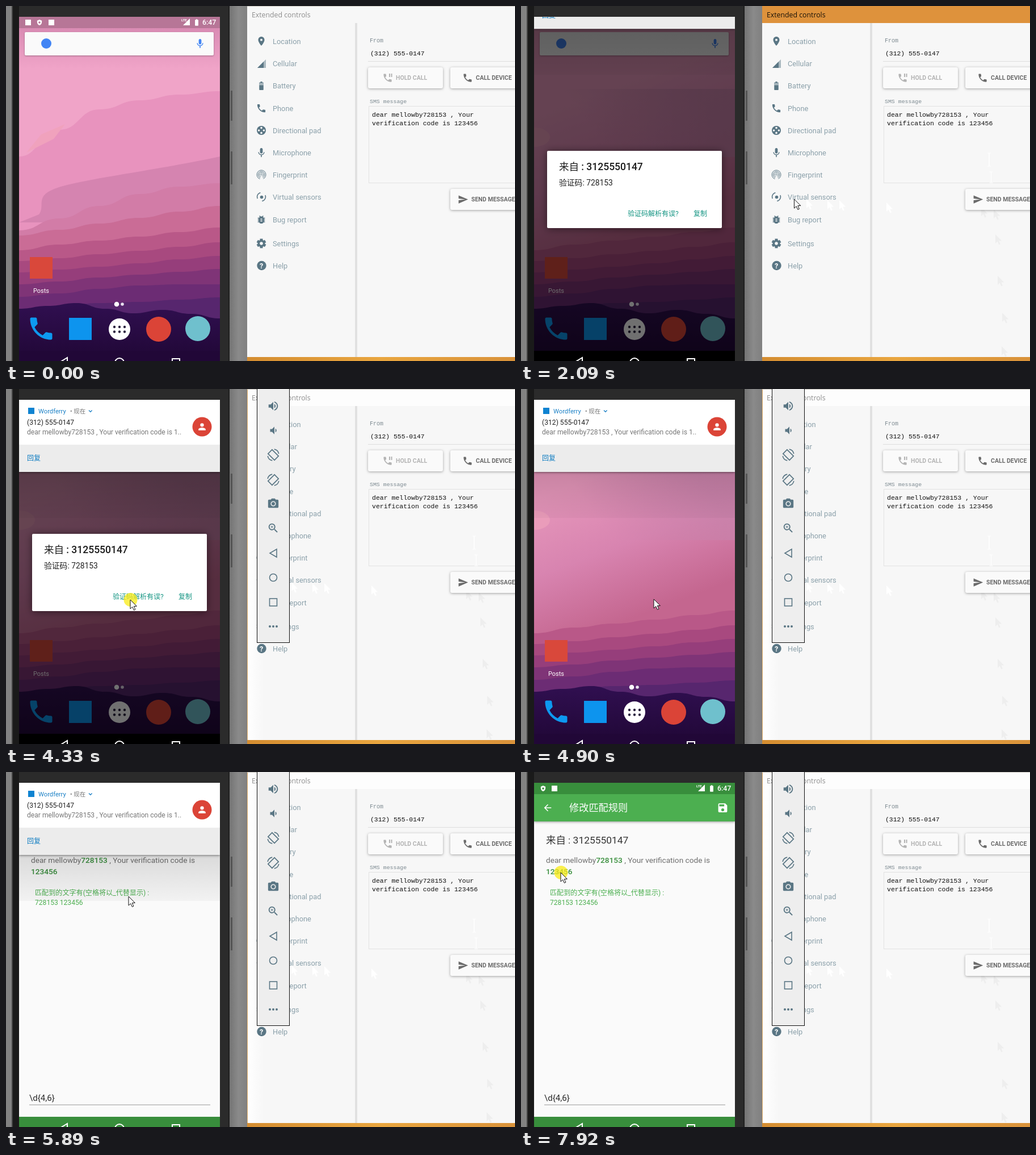
An HTML page with a canvas for the animation above (8 s loop, 897 by 625 pixels).

```html
<!DOCTYPE html>
<html lang="en">
<head>
<meta charset="utf-8">
<title>Message code demo</title>
<style>
html, body { margin: 0; width: 100%; height: 100%; overflow: hidden; }
canvas { display: block; width: 100vw; height: 100vh; }
</style>
</head>
<body>
<canvas id="stage" width="897" height="625"></canvas>
<script>
const ctx = document.getElementById('stage').getContext('2d');
const LOOP = 8000;
const SANS = 'Roboto, "Noto Sans CJK SC", "Noto Sans CJK", sans-serif';
const MONO = '"Liberation Mono", monospace';
const UI = '"Open Sans", sans-serif';
const SLATE = '#5a7684';

const USER = 'mellowby', CODE = '728153', CODE2 = '123456';
const PHONE = '(312) 555-0147', DIGITS = '3125550147';

const ICONS = {
  place: 'M12 2C8.13 2 5 5.13 5 9c0 5.25 7 13 7 13s7-7.75 7-13c0-3.87-3.13-7-7-7zm0 9.5c-1.38 0-2.5-1.12-2.5-2.5s1.12-2.5 2.5-2.5 2.5 1.12 2.5 2.5-1.12 2.5-2.5 2.5z',
  battery: 'M15.67 4H14V2h-4v2H8.33C7.6 4 7 4.6 7 5.33v15.33C7 21.4 7.6 22 8.33 22h7.33c.74 0 1.34-.6 1.34-1.33V5.33C17 4.6 16.4 4 15.67 4z',
  phone: 'M6.62 10.79c1.44 2.83 3.76 5.14 6.59 6.59l2.2-2.2c.27-.27.67-.36 1.02-.24 1.12.37 2.33.57 3.57.57.55 0 1 .45 1 1V20c0 .55-.45 1-1 1-9.39 0-17-7.61-17-17 0-.55.45-1 1-1h3.5c.55 0 1 .45 1 1 0 1.25.2 2.45.57 3.57.11.35.03.74-.25 1.02l-2.2 2.2z',
  mic: 'M12 14c1.66 0 3-1.34 3-3V5c0-1.66-1.34-3-3-3S9 3.34 9 5v6c0 1.66 1.34 3 3 3zm5.3-3c0 3-2.54 5.1-5.3 5.1S6.7 14 6.7 11H5c0 3.41 2.72 6.23 6 6.72V22h2v-4.28c3.28-.48 6-3.3 6-6.72h-1.7z',
  send: 'M2 21L23 12 2 3v7l15 2-15 2z',
  bug: 'M20 8h-2.81c-.45-.78-1.07-1.45-1.82-1.96L17 4.41 15.59 3l-2.17 2.17a6 6 0 0 0-2.83 0L8.41 3 7 4.41l1.62 1.63C7.88 6.55 7.26 7.22 6.81 8H4v2h2.09L6 11v1H4v2h2v1l.09 1H4v2h2.81a6 6 0 0 0 10.38 0H20v-2h-2.09l.09-1v-1h2v-2h-2v-1l-.09-1H20zm-6 8h-4v-2h4zm0-4h-4v-2h4z',
  speaker: 'M3 9v6h4l5 5V4L7 9z',
  wave: 'M16.5 12c0-1.77-1.02-3.29-2.5-4.03v8.05c1.48-.73 2.5-2.25 2.5-4.02z',
  loud: 'M14 3.23v2.06c2.89.86 5 3.54 5 6.71s-2.11 5.85-5 6.71v2.06c4.01-.91 7-4.49 7-8.77s-2.99-7.86-7-8.77z',
  camera: 'M9 2L7.17 4H4c-1.1 0-2 .9-2 2v12c0 1.1.9 2 2 2h16c1.1 0 2-.9 2-2V6c0-1.1-.9-2-2-2h-3.17L15 2zm3 15a5 5 0 1 1 0-10 5 5 0 0 1 0 10z',
  zoom: 'M15.5 14h-.79l-.28-.27A6.5 6.5 0 1 0 13.73 14.43l.27.28v.79l5 4.99L20.49 19zm-6 0a4.5 4.5 0 1 1 0-9 4.5 4.5 0 0 1 0 9zM12 10h-2v2H9v-2H7V9h2V7h1v2h2z',
  save: 'M17 3H5a2 2 0 0 0-2 2v14a2 2 0 0 0 2 2h14a2 2 0 0 0 2-2V7zm-5 16a3 3 0 1 1 0-6 3 3 0 0 1 0 6zm3-10H5V5h10z',
  back: 'M20 11H7.83l5.59-5.59L12 4l-8 8 8 8 1.41-1.41L7.83 13H20z',
  person: 'M12 12a4 4 0 1 0 0-8 4 4 0 0 0 0 8zm0 2c-2.67 0-8 1.34-8 4v2h16v-2c0-2.66-5.33-4-8-4z',
  shield: 'M12 1L3 5v6c0 5.5 3.8 10.7 9 12 5.2-1.3 9-6.5 9-12V5zm0 7a4 4 0 1 1 0 8 4 4 0 0 1 0-8z'
};
for (const k in ICONS) ICONS[k] = new Path2D(ICONS[k]);

// ---- drawing helpers ----
function rect(x, y, w, h, fill) { ctx.fillStyle = fill; ctx.fillRect(x, y, w, h); }
function disc(x, y, r, fill) {
  ctx.fillStyle = fill; ctx.beginPath(); ctx.arc(x, y, r, 0, 7); ctx.fill();
}
function ring(x, y, r, color, w = 1.5, a = 0, b = Math.PI * 2) {
  ctx.strokeStyle = color; ctx.lineWidth = w;
  ctx.beginPath(); ctx.arc(x, y, r, a, b); ctx.stroke();
}
function path(pts) {
  ctx.beginPath();
  pts.forEach(([x, y], i) => i ? ctx.lineTo(x, y) : ctx.moveTo(x, y));
}
function line(pts, color, w = 1.5) {
  ctx.strokeStyle = color; ctx.lineWidth = w; path(pts); ctx.stroke();
}
function text(s, x, y, size, color, weight = 400, family = SANS) {
  ctx.font = `${weight} ${size}px ${family}`;
  ctx.fillStyle = color;
  ctx.fillText(s, x, y + size * 0.36);
  return x + ctx.measureText(s).width;
}
function icon(name, cx, cy, size, color) {
  ctx.save();
  ctx.translate(cx - size / 2, cy - size / 2);
  ctx.scale(size / 24, size / 24);
  ctx.fillStyle = color;
  ctx.fill(ICONS[name], 'evenodd');
  ctx.restore();
}
function card(x, y, w, h, fill, blur, alpha, r = 2) {
  ctx.save();
  ctx.shadowColor = `rgba(0,0,0,${alpha})`;
  ctx.shadowBlur = blur; ctx.shadowOffsetY = 1;
  ctx.fillStyle = fill;
  ctx.beginPath(); ctx.roundRect(x, y, w, h, r); ctx.fill();
  ctx.restore();
}
function fade(x0, y0, x1, y1, ...stops) {
  const g = ctx.createLinearGradient(x0, y0, x1, y1);
  stops.forEach((c, i) => g.addColorStop(i / (stops.length - 1), c));
  return g;
}
const span = (t, a, b) => Math.min(1, Math.max(0, (t - a) / (b - a)));

// ---- pointer ----
const ROUTE = [
  [50, 847, 599], [150, 848, 540], [270, 840, 475], [390, 836, 402], [480, 833, 358],
  [560, 828, 303], [620, 825, 270], [800, 825, 270], [1030, 831, 342], [1400, 831, 342],
  [1500, 811, 354], [1740, 746, 352], [1850, 644, 346], [1930, 561, 342], [1970, 540, 342],
  [2030, 503, 340], [2090, 482, 340], [2200, 422, 346], [2500, 270, 350], [2660, 258, 348],
  [2830, 232, 325], [2890, 229, 300], [3200, 160, 94], [3350, 126, 92], [3640, 126, 316],
  [3720, 130, 320], [4200, 219, 371], [4600, 219, 371], [4900, 234, 370], [5200, 234, 370],
  [5850, 216, 219], [5950, 216, 219], [6280, 125, 75], [6380, 125, 75], [6770, 465, 78],
  [6900, 440, 110], [7200, 228, 240], [7330, 200, 243], [7600, 113, 176], [7860, 70, 177], [LOOP, 70, 177]
];
const CLICKS = [[1220, 1340], [4260, 4570], [6330, 6760], [7850, LOOP]];
const GHOSTS = [0, 1, 2, 3, 4, 10, 12, 13, 14, 15, 16];

function pointer(t) {
  const i = ROUTE.findIndex(p => p[0] >= t);
  if (i <= 0) return [ROUTE[0][1], ROUTE[0][2]];
  const [a, ax, ay] = ROUTE[i - 1], [b, bx, by] = ROUTE[i];
  const u = span(t, a, b);
  return [ax + (bx - ax) * u, ay + (by - ay) * u];
}
function arrow(x, y, fill, edge) {
  ctx.save(); ctx.translate(x, y);
  path([[0, 0], [0, 16], [3.7, 12.6], [6.4, 18.4], [8.9, 17.2], [6.3, 11.6], [11.3, 11.4]]);
  ctx.closePath();
  ctx.fillStyle = fill; ctx.fill();
  if (edge) { ctx.strokeStyle = edge; ctx.lineWidth = 1; ctx.stroke(); }
  ctx.restore();
}
function beam(x, y, h, color) {
  line([[x - 3, y], [x + 3, y]], color, 1);
  line([[x, y], [x, y + h]], color, 1.4);
  line([[x - 3, y + h], [x + 3, y + h]], color, 1);
}

// ---- phone ----
// colour, then edge heights from the left side to the right side
const BANDS = [
  ['#e893be', 265, 218, 182, 166, 156, 150],
  ['#d584b0', 381, 352, 308, 297, 279, 265],
  ['#d27ca7', 395, 374, 352, 331, 318, 312],
  ['#ca6c96', 404, 394, 383, 373, 362, 352],
  ['#b95888', 430, 420, 413, 406, 398, 390],
  ['#a8497f', 449, 444, 437, 431, 424, 416],
  ['#963e7b', 469, 464, 459, 453, 446, 440],
  ['#7f3477', 490, 485, 478, 473, 468, 463],
  ['#6c2c74', 512, 506, 498, 492, 490, 490],
  ['#57266e', 533, 529, 523, 521, 517, 513]
];
function wave(ys) {
  const step = 354 / (ys.length - 1);
  ctx.beginPath(); ctx.moveTo(23, ys[0]);
  for (let i = 1; i < ys.length; i++) {
    const x = 23 + step * i, m = x - step / 2;
    ctx.bezierCurveTo(m, ys[i - 1], m, ys[i], x, ys[i]);
  }
  ctx.lineTo(377, 625); ctx.lineTo(23, 625); ctx.closePath();
}
// under the dialog the upper bands melt into one slanted gradient
function wallpaper(soft) {
  rect(23, 19, 354, 606, soft
    ? fade(90, 170, 180, 410, '#e697bb', '#d884b0', '#c4668f')
    : fade(0, 40, 0, 110, '#da8cb4', '#f0a4c8'));
  if (soft) {
    rect(23, 146, 354, 120, fade(150, 250, 300, 140, 'rgba(200,130,170,0)', 'rgba(200,130,170,.8)'));
    ctx.fillStyle = '#ea9cba';
    ctx.beginPath(); ctx.ellipse(23, 231, 28, 17, 0, 0, 7); ctx.fill();
  }
  BANDS.forEach(([color, ...ys], i) => {
    if (soft && i < 4) return;
    if (i === 1) {
      ctx.beginPath(); ctx.moveTo(377, 265);
      ctx.bezierCurveTo(250, 292, 130, 305, 85, 322);
      ctx.bezierCurveTo(50, 336, 70, 352, 58, 367);
      ctx.lineTo(23, 381); ctx.lineTo(377, 381); ctx.closePath();
    } else wave(ys);
    ctx.fillStyle = color; ctx.fill();
    if (!i) {
      path([[36, 258], [62, 226], [104, 208], [84, 234]]);
      ctx.fillStyle = '#f0a2bd'; ctx.fill();
    }
  });
  wave([533, 528, 523, 533, 541, 535, 542, 550]);
  ctx.fillStyle = fade(0, 525, 0, 612, '#300f50', '#220839'); ctx.fill();
}
function status(bg, full) {
  rect(23, 19, 354, 20, bg);
  if (full) rect(34, 24, 10, 10, '#fff');
  icon('shield', full ? 59 : 39, 29, 11, '#fff');
  rect(full ? 75 : 54, 24, 10, 10, '#fff');
  text('LTE', 309, 25, 6, '#fff', 700);
  path([[312, 34], [324, 34], [324, 22]]); ctx.fillStyle = '#fff'; ctx.fill();
  icon('battery', 336, 29, 14, '#fff');
  text('6:47', 346, 29, 12.4, '#fff', 500);
}
function home(t) {
  wallpaper(t > 1860);
  card(33, 46, 333, 41, '#fafafa', 3, 0.3);
  disc(71, 66, 9, '#4285f4');
  icon('mic', 342, 66, 19, '#4285f4');
  rect(42, 442, 40, 38, '#d9483b');
  text('Posts', 48, 501, 10.9, '#fff');
  disc(195, 525, 4.3, '#fff');
  disc(205, 525, 2.8, '#e8e0ee');
  icon('phone', 62, 568, 52, '#0d99f0');
  rect(111, 549, 40, 39, '#0d94ee');
  disc(200, 569, 19, '#fff');
  for (let i = 0; i < 6; i++) disc(191 + i % 3 * 9, 565 + (i > 2) * 8.5, 2.2, '#2c2240');
  disc(269, 569, 22, '#db4437');
  disc(338, 568, 22, '#6fc0cd');
  status(t > 1650 && t < 4570 ? '#000' : 'rgba(0,0,0,.16)', true);
}
function dialog(alpha) {
  ctx.globalAlpha = alpha;
  card(46, 255, 308, 136, '#fff', 14, 0.5);
  text('来自 : ' + DIGITS, 67, 283, 17.5, '#1c1c1c', 500);
  text('验证码: ' + CODE, 67, 311, 13.8, '#222');
  text('验证码解析有误?', 188, 366, 12, '#159583');
  text('复制', 304, 366, 12, '#159583');
  ctx.globalAlpha = 1;
}
function editor() {
  rect(23, 19, 354, 606, '#fafafa');
  card(23, 39, 354, 48, '#4caf50', 4, 0.4, 0);
  status('#388e3c', false);
  icon('back', 47, 63, 19, '#fff');
  text('修改匹配规则', 85, 63, 17.2, '#fff');
  icon('save', 355.5, 63, 21, '#fff');
  text('来自 : ' + DIGITS, 44, 120, 17.4, '#333');
  let x = text('dear ' + USER, 44, 155, 13.65, '#6f6f6f');
  x = text(CODE, x, 155, 13.65, '#388e3c', 500);
  text(' , Your verification code is', x, 155, 13.65, '#6f6f6f');
  text(CODE2, 44, 175, 13.65, '#388e3c', 500);
  text('匹配到的文字有(空格将以_代替显示) :', 51, 213, 12.1, '#4caf50');
  text(CODE + ' ' + CODE2, 51, 230, 12.1, '#4caf50');
  text('\\d{4,6}', 41, 574, 15.1, '#2b2b2b');
  rect(41, 585.5, 319, 1, '#9a9a9a');
}
function notice(dx, dy) {
  ctx.save();
  ctx.translate(dx, dy);
  ctx.globalAlpha = 1 - span(dx, 120, 350);
  rect(23, 146, 354, 81, fade(0, 146, 0, 227, 'rgba(0,0,0,.13)', 'rgba(0,0,0,.03)'));
  card(23, 19, 354, 127, '#ececec', 4, 0.5, 0);
  rect(23, 19, 354, 79, '#fff');
  rect(39, 33, 11, 11, '#0f83d1');
  text('Wordferry', 57, 39, 11.2, '#1b80c6');
  text('• 现在', 113, 39, 10.5, '#777');
  line([[146, 37.5], [148.8, 40.3], [151.6, 37.5]], '#1b80c6', 1.3);
  text(PHONE, 37, 59, 12.15, '#222');
  text(`dear ${USER}${CODE} , Your verification code is 1..`, 37, 76, 12.1, '#777');
  disc(345.5, 66.5, 17, '#db4437');
  icon('person', 345.5, 66.5, 19, '#fff');
  text('回复', 37, 122, 12, '#0f7dc2');
  ctx.restore();
}
function navbar(bg) {
  rect(23, 607, 354, 18, bg);
  path([[108, 619], [95, 627], [108, 635]]); ctx.closePath();
  ctx.strokeStyle = '#fff'; ctx.lineWidth = 2; ctx.stroke();
  ring(200, 628, 8, '#fff', 2);
  ctx.strokeRect(293, 621, 13, 13);
}
function phone(t, px) {
  rect(0, 0, 425, 625, '#828282');
  rect(394, 0, 31, 625, fade(394, 0, 425, 0, '#747474', '#8a8a8a', '#808080'));
  rect(10, 0, 384, 625, '#2b2b2b');
  rect(10, 0, 2, 625, '#444');
  rect(12, 0, 11, 625, '#1a1a1a');
  rect(392, 0, 2, 625, '#202020');
  rect(396, 149, 3, 53, '#555');
  rect(396, 256, 3, 58, '#555');

  ctx.save();
  ctx.beginPath(); ctx.rect(23, 19, 354, 606); ctx.clip();
  const dim = t < 4570 ? span(t, 1780, 1960) : 1 - span(t, 4570, 4900);
  const open = 1 - Math.pow(1 - span(t, 5140, 5480), 2);
  if (open < 1) {
    home(t);
    if (dim) rect(23, 39, 354, 586, `rgba(0,0,0,${0.56 * dim})`);
    const shown = t < 4570 ? span(t, 1800, 1960) : 1 - span(t, 4570, 4720);
    if (shown) dialog(shown);
  }
  if (open) {
    ctx.save();
    ctx.globalAlpha = open;
    ctx.translate(0, 48 * (1 - open));
    editor();
    ctx.restore();
  }
  navbar(open ? '#388e3c' : dim > 0.5 ? '#000' : 'rgba(32,8,54,.6)');
  if (t > 2030 && t < 6800) {
    const drag = t > 6380 ? Math.max(0, px - 125) * 1.05 : 0;
    notice(drag, -128 * Math.pow(1 - span(t, 2030, 2830), 2.4));
  }
  ctx.restore();
}

// ---- extended controls window ----
const MENU = [
  ['Location', 62, y => icon('place', 450, y, 19, SLATE)],
  ['Cellular', 101, y => {
    path([[443, y + 8], [458, y + 8], [458, y - 7]]); ctx.fillStyle = '#a9b8bf'; ctx.fill();
    path([[443, y + 8], [454, y + 8], [454, y - 3]]); ctx.fillStyle = SLATE; ctx.fill();
  }],
  ['Battery', 140.5, y => { icon('battery', 450, y, 18, SLATE); rect(446, y - 5, 8, 4, '#a9b8bf'); }],
  ['Phone', 180, y => icon('phone', 450, y, 19, SLATE)],
  ['Directional pad', 219, y => {
    disc(450, y, 8, SLATE);
    for (let i = 0; i < 4; i++) disc(450 + 4.4 * Math.cos(i * Math.PI / 2), y + 4.4 * Math.sin(i * Math.PI / 2), 1.8, '#f7f7f7');
  }],
  ['Microphone', 258, y => icon('mic', 450, y, 19, SLATE)],
  ['Fingerprint', 297, y => {
    for (let r = 1.4; r < 9; r += 2.2) ring(450, y, r, SLATE, 1, 1.9, 7.4);
  }],
  ['Virtual sensors', 336, y => {
    disc(450.5, y + 0.5, 2.8, SLATE);
    ring(450, y, 7.5, SLATE, 1.6, 2.7, 4.5);
    ring(450, y, 7.5, SLATE, 1.6, -0.4, 1.4);
  }],
  ['Bug report', 376, y => icon('bug', 450, y, 19, SLATE)],
  ['Settings', 418, y => {
    for (let i = 0; i < 6; i++) {
      ctx.save(); ctx.translate(450, y); ctx.rotate(i * Math.PI / 3);
      rect(-2.5, -8.3, 5, 5, SLATE); ctx.restore();
    }
    ring(450, y, 4.6, SLATE, 3.6);
  }],
  ['Help', 457, y => { disc(450.5, y, 8.2, SLATE); text('?', 447, y, 12.5, '#fff', 700); }]
];
function button(x, y, label, name, tx, color) {
  card(x, y, x < 700 ? 132 : 130, 37, '#fafafa', 4, 0.35, 3);
  icon(name, tx - 14.5, y + 18.5, 19, color);
  text(label, tx, y + 18.5, 10.5, color, 700);
}
function controls(t, active, docked) {
  rect(425, 0, 472, 625, '#f7f7f7');
  if (docked) {
    rect(425, 0, 472, 30, '#fdfdfd');
    rect(425, 30, 30, 588, fade(425, 0, 455, 0, '#fff', '#f7f7f7'));
    rect(425, 0, 1, 618, '#e3b06a');
  }
  rect(425, 0, 472, 1, active ? '#d08430' : '#c9c5bd');
  if (active) rect(425, 0, 472, 30, '#de923c');
  text('Extended controls', 433, 15.5, 12.3, active ? '#1a1208' : '#8d8d8d', 400, UI);
  rect(615, 30, 4, 588, '#e1e1e1');
  MENU.forEach(([label, y, draw]) => { draw(y); text(label, 470, y, 12.8, '#8ba0aa'); });

  text('From', 641, 60, 10, '#7d8a91', 400, MONO);
  text(PHONE, 642, 83, 11.4, '#111', 400, MONO);
  rect(638, 97, 259, 1, '#dedede');
  button(638, 108, 'HOLD CALL', 'phone', 687, '#b4b4b4');
  rect(675, 119, 2, 6, '#b4b4b4'); rect(678.5, 119, 2, 6, '#b4b4b4');
  button(783, 108, 'CALL DEVICE', 'phone', 828, '#6b6b6b');
  text('SMS message', 641, 167, 9.9, '#7d8a91', 400, MONO);
  ctx.strokeStyle = '#e2e2e2'; ctx.lineWidth = 1;
  ctx.strokeRect(639.5, 176.5, 270, 135);
  text(`dear ${USER}${CODE} , Your`, 645, 191, 11.5, '#111', 400, MONO);
  text('verification code is ' + CODE2, 645, 206, 11.5, '#111', 400, MONO);

  GHOSTS.forEach(i => {
    const [at, x, y] = ROUTE[i];
    if (t > at + 40) arrow(x, y, x > 700 ? '#eeeeee' : '#fff');
  });
  if (t > 600) beam(828.5, 292, 19, '#fff');
  if (t > 1030) beam(825, 259, 23, '#fff');
  button(783, 322, 'SEND MESSAGE', 'send', 820, '#6b6b6b');
  rect(425, 618, 472, 7, fade(425, 0, 897, 0, '#d48d31', '#e9a63f', '#d9923a'));
}

// ---- emulator toolbar ----
function tilted(y, dir) {
  ctx.save(); ctx.translate(471, y); ctx.rotate(dir * Math.PI / 4);
  ctx.strokeStyle = SLATE; ctx.lineWidth = 1.7;
  ctx.strokeRect(-5, -8, 10, 16);
  ctx.restore();
  const a = dir < 0 ? -1.4 : -2.95;
  ring(471, y, 10, SLATE, 1.6, a, a + 1.2);
  ring(471, y, 10, SLATE, 1.6, a + Math.PI, a + Math.PI + 1.2);
}
function toolbar() {
  rect(442, -1, 58, 448, '#111');
  rect(443, 0, 56, 446, '#eeeeee');
  for (const n of ['speaker', 'wave', 'loud']) icon(n, 471, 30, 22, SLATE);
  for (const n of ['speaker', 'wave']) icon(n, 473, 73, 20, SLATE);
  tilted(116, -1);
  tilted(160, 1);
  icon('camera', 471, 202, 22, SLATE);
  disc(471, 202, 3, SLATE);
  icon('zoom', 471, 245, 22, SLATE);
  path([[477, 282], [465, 289], [477, 296]]); ctx.closePath();
  ctx.strokeStyle = SLATE; ctx.lineWidth = 1.6; ctx.stroke();
  ring(471, 332, 6.5, SLATE, 1.6);
  ctx.strokeRect(464.5, 369, 13, 13);
  for (let i = -1; i < 2; i++) disc(471 + i * 6, 418, 2, SLATE);
}

function draw(t) {
  const [x, y] = pointer(t);
  const docked = t >= 4270;
  ctx.clearRect(0, 0, 897, 625);
  phone(t, x);
  controls(t, t > 1290 && !docked, docked);
  if (docked) toolbar();
  if (t < 50) return;
  if (CLICKS.some(([a, b]) => t >= a && t < b)) disc(x + 0.5, y, 12, 'rgba(250,235,20,.75)');
  if (t > 520 && t < 960) beam(x, y - 11, 22, '#222');
  else arrow(x, y, '#fff', '#111');
}
function tick(now) {
  draw(now % LOOP);
  requestAnimationFrame(tick);
}
requestAnimationFrame(tick);
</script>
</body>
</html>
```
